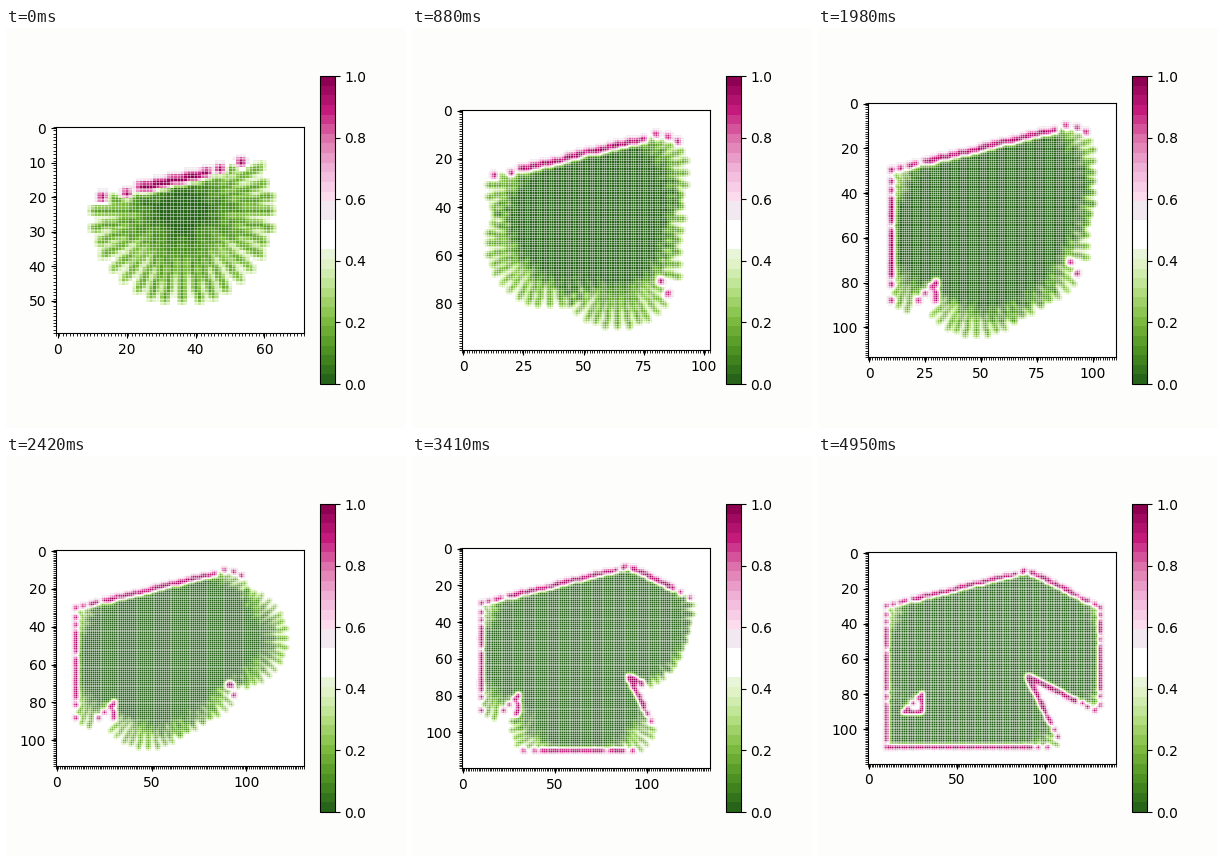
Recreate the animation shown at these times as a matplotlib script. Size 400x400 px, loop 5.06 s.

```python
import numpy as np
import matplotlib
import matplotlib.pyplot as plt
from matplotlib.animation import FuncAnimation
from matplotlib.colors import ListedColormap, to_rgba

TICKS, INTERVAL = 46, 110
STATES = 44
REACH, SHORT_REACH = 26, 16      # sensor range in cells
MARGIN = 10
WORLD = 160

ROOM = [(10, 110), (10, 30), (90, 10), (131, 30.5), (131, 90.5), (90, 70), (110, 110)]
BLOCK = [(30, 80), (30, 90), (20, 90)]

# turning points of the robot: state, x, y
TURNS = np.array([
    (0, 44, 31.4), (1, 44, 55.4), (3, 65, 42), (5, 75, 26), (7, 72, 64),
    (9, 48, 78), (11, 25, 48), (14, 75, 40), (17, 22, 67), (20, 88, 46),
    (21, 95, 46), (24, 99, 31), (27, 80, 90), (29, 52, 94), (32, 18, 96),
    (34, 84, 96), (36, 86, 64), (37, 97, 62), (41, 112, 70), (43, 112, 42),
])


def edges(points):
    return list(zip(points, points[1:] + points[:1]))


WALLS = np.array(edges(ROOM) + edges(BLOCK), float)


def robot(state):
    return np.array([np.interp(state, TURNS[:, 0], TURNS[:, i]) for i in (1, 2)])


def cast(pos, angle, reach):
    """Return the end of a beam and whether it met a wall."""
    ray = np.array([np.cos(angle), np.sin(angle)])
    start, span = WALLS[:, 0] - pos, WALLS[:, 1] - WALLS[:, 0]
    det = ray[0] * span[:, 1] - ray[1] * span[:, 0]
    det[np.abs(det) < 1e-9] = 1e-9
    dist = (start[:, 0] * span[:, 1] - start[:, 1] * span[:, 0]) / det
    along = (start[:, 0] * ray[1] - start[:, 1] * ray[0]) / det
    valid = (dist > 1e-6) & (along > -1e-6) & (along < 1 + 1e-6)
    nearest = dist[valid].min(initial=np.inf)
    return pos + ray * min(nearest, reach), nearest <= reach


def blur(grid, sigma):
    taps = np.arange(-3, 4)
    weights = np.exp(-taps**2 / (2 * sigma**2))
    weights /= weights.sum()
    for axis in (0, 1):
        grid = sum(w * np.roll(grid, t, axis) for t, w in zip(taps, weights))
    return grid


class Mapper:
    def __init__(self):
        self.passes = np.zeros((WORLD, WORLD))
        self.wall = np.zeros((WORLD, WORLD))
        self.ends = []

    def scan(self, pos, reach):
        home = np.rint(pos).astype(int)
        for angle in np.radians(np.arange(0, 360, 10)):
            end, hit = cast(pos, angle, reach)
            x, y = cell = np.rint(end).astype(int)
            steps = np.abs(cell - home).max() + 1
            line = np.rint(np.linspace(home, cell, steps)).astype(int)
            self.passes[line[:, 1], line[:, 0]] += 1
            if hit:
                self.wall[y - 1:y + 2, x - 1:x + 2] = 1
            self.ends.append(cell)

    def crop(self):
        free = 0.5 * np.exp(-3.2 * blur(self.passes, 0.95))
        solid = blur(self.wall, 0.75)
        full = free + (1 - free) * solid
        x0, y0 = np.min(self.ends, axis=0) - MARGIN
        x1, y1 = np.max(self.ends, axis=0) + MARGIN
        return full[y0:y1, x0:x1]


def build_maps():
    mapper, maps = Mapper(), []
    for state in range(STATES):
        if state:
            mapper.scan(robot(state - 0.5), SHORT_REACH)
        mapper.scan(robot(state), REACH)
        maps.append(mapper.crop())
    return maps


def make_cmap():
    colors = matplotlib.colormaps["PiYG_r"].resampled(32)(np.arange(32))
    colors[14:17] = 1
    colors[17:19] = to_rgba("#f1e9ef")
    return ListedColormap(colors)


maps = build_maps()
fig, ax = plt.subplots(figsize=(4, 4), dpi=100, facecolor="#fdfefc")
im = ax.imshow(maps[0], cmap=make_cmap(), vmin=0, vmax=1)
fig.colorbar(im, ax=ax)


def draw(tick):
    # the robot rests for one extra tick at the start and halfway
    grid = maps[tick - (tick > 0) - (tick > 25)]
    h, w = grid.shape
    im.set_data(grid)
    im.set_extent((-0.5, w - 0.5, h - 0.5, -0.5))
    ax.set_xlim(-0.5, w - 0.5)
    ax.set_ylim(h - 0.5, -0.5)
    ax.set_xticks(np.arange(-0.5, w, 1), minor=True)
    ax.set_yticks(np.arange(-0.5, h, 1), minor=True)
    ax.grid(True, which="minor", color="w", linewidth=0.6, alpha=0.5)
    return [im]


anim = FuncAnimation(fig, draw, frames=TICKS, interval=INTERVAL,
                     init_func=lambda: draw(0), repeat=True, repeat_delay=0)
plt.show()
```
